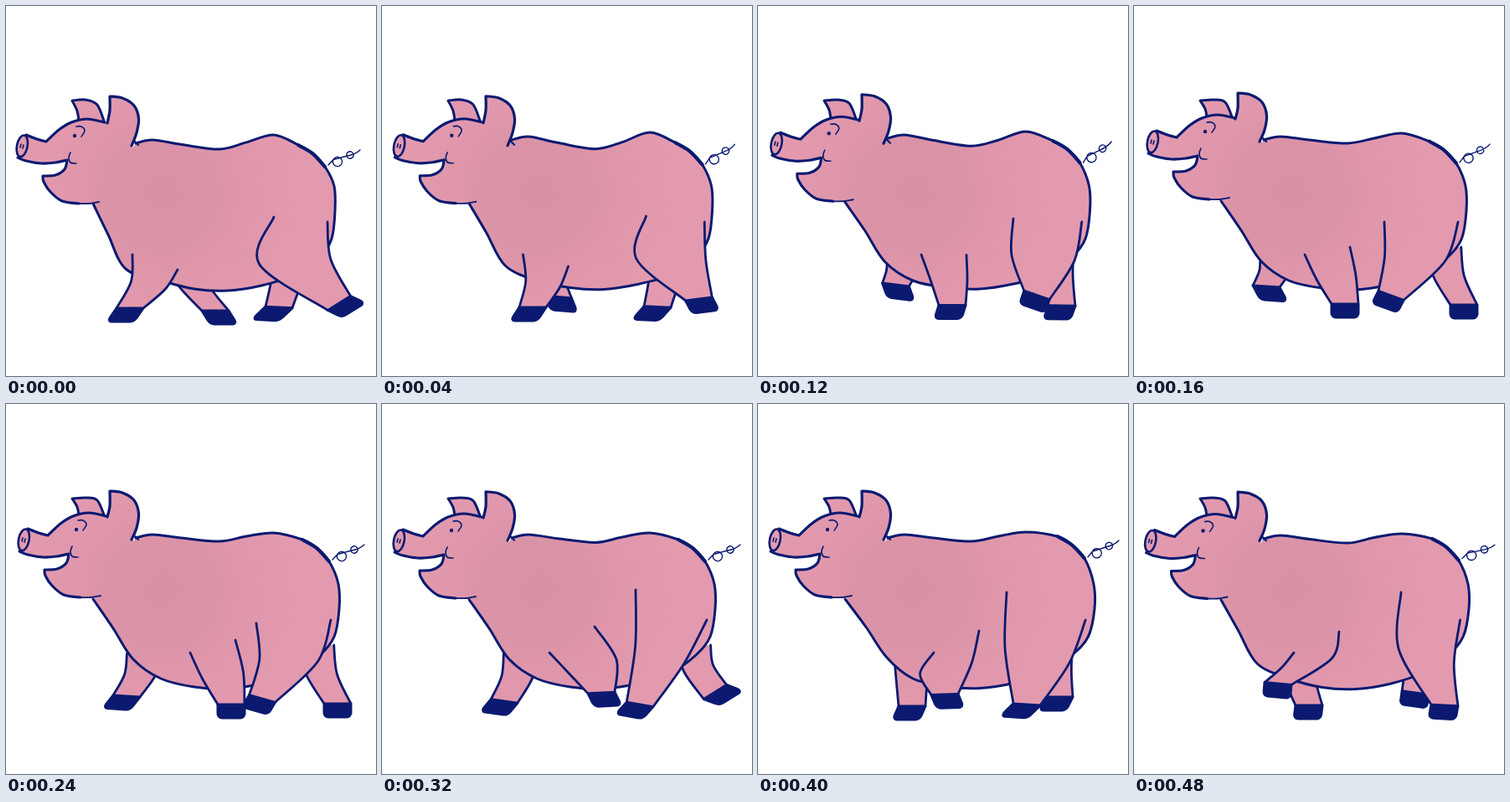
These frames come from a looping animation (442x442 px, 560 ms). An HTML page with a canvas:

```html
<!DOCTYPE html>
<html lang="en">
<head>
<meta charset="utf-8">
<title>Walking pig</title>
<style>
  html, body { margin: 0; width: 100%; height: 100%; overflow: hidden; background: #fff; }
  canvas { display: block; width: 100vw; height: 100vh; }
</style>
</head>
<body>
<canvas width="442" height="442"></canvas>
<script>
const ctx = document.querySelector('canvas').getContext('2d');
const INK = '#0b1a70';
const PINK = ctx.createRadialGradient(185, 222, 10, 185, 222, 170);
PINK.addColorStop(0, '#d991a6');
PINK.addColorStop(0.35, '#db93a8');
PINK.addColorStop(0.6, '#e097ac');
PINK.addColorStop(1, '#e39aaf');

// Seven key poses of the walk, one row each.
// Shifts: head x, head y, shoulder, hump, rump, chest
const BODY = [
  [-3, 5, 4, 0, -5, -9], [-.5, 4.5, -4, -6, -2, -1], [0, 0, 0, -2, -1, 0], [-1, 0, 0, 0, 0, 0],
  [-2, 1, 0, 0, 0, 0], [-2, 0, 0, -1, 4, 2], [-2.5, 1.5, 1, 1, 2, -5]
];
// Ankle x, ankle y, hoof tilt in degrees, hoof skew
const FAR_FRONT = [
  [250, 364, 0, 10], [171, 331, 10, 6], [158, 335, 4, 10], [144, 349, 4, -11],
  [146, 355, 8, -10], [184, 361, 0, -7], [209, 360, 0, -2]
];
const FAR_HIND = [
  [326, 360, 3, -15], [332, 359, 2, -11], [394, 357, 0, 0], [396, 358, 0, 0],
  [398, 344, -32, 12], [360, 350, 0, -8], [336, 345, 8, 0]
];
// The same, then one hip corner x and y, front bend, back bend
const NEAR_FRONT = [
  [148, 361, 0, -11, 205, 315, 8, 6], [212, 359, 0, -10, 240, 307, 3, 1],
  [252, 356, 0, 0, 258, 288, -2, 2], [269, 359, 0, 0, 274, 282, -2, 4],
  [262, 345, -3, 7, 254, 266, 0, 14], [223, 347, -2, 6, 264, 271, -15, 4],
  [172, 334, 5, 0, 245, 272, 3, 20]
];
const NEAR_HIND = [
  [398, 355, -32, 10, 320, 252, -50, -10], [359, 345, 18, 2, 311, 250, -21, 4],
  [307, 346, 20, -2, 299, 258, 4, 17], [306, 352, 16, -4, 299, 262, 8, 18],
  [308, 359, 10, -10, 303, 222, 5, 5], [321, 359, 4, -14, 297, 225, -6, 8],
  [371, 360, 3, -2, 319, 225, -21, -6]
];

// [start in ms, pose]; a half means midway to the next pose.
const STEPS = [[0, 0], [40, .5], [80, 1], [120, 1.5], [160, 2],
  [240, 3], [320, 4], [360, 4.5], [400, 5], [480, 6]];
const LOOP = 560;

const points = text => text.split(' ').map(pair => pair.split(',').map(Number));
const CROWN = points('121,134 100,130 81,134 66,143 51,157');
const SNOUT = points('51,157 40,154 27,149');
const JAW = [
  points('17,176 27,180 45,183 62,182 76,179'),
  points('76,179 73,190 62,197 47,198'),
  points('47,198 48,205 56,217 70,228 90,231')
];
const THROAT = points('90,231 103,231 114,229');
const NECK = points('150,225 158,168');
const FACE = ['21,160 20,164', '24,161 23,165', '80,170 78,176 80,182 87,183',
  '87,139 93,139 97,144 93,151'].map(points);

const mix = (a, b, k) => a + (b - a) * k;

function keyed(track, pose) {
  const to = track[Math.ceil(pose)];
  return track[Math.floor(pose)].map((v, i) => mix(v, to[i], pose % 1));
}

// Smooth curve through the points, joined to the current path.
function curve(p) {
  ctx.lineTo(...p[0]);
  for (let i = 0; i < p.length - 1; i++) {
    const a = p[i - 1] || p[i], b = p[i], c = p[i + 1], d = p[i + 2] || c;
    ctx.bezierCurveTo(b[0] + (c[0] - a[0]) / 6, b[1] + (c[1] - a[1]) / 6,
      c[0] - (d[0] - b[0]) / 6, c[1] - (d[1] - b[1]) / 6, ...c);
  }
}

function fill(...curves) {
  ctx.beginPath();
  curves.forEach(curve);
  ctx.fillStyle = PINK;
  ctx.fill();
}

function line(width, ...curves) {
  ctx.beginPath();
  curves.forEach(curve);
  ctx.lineWidth = width;
  ctx.stroke();
}

function drawLeg([x, y, tilt, skew], frontTop, backTop, frontBend, backBend) {
  const angle = tilt * Math.PI / 180, half = 16, depth = 16;
  const edge = (top, side, bend) => {
    const ankle = [x + side * half * Math.cos(angle), y + side * half * Math.sin(angle)];
    return [top, [mix(top[0], ankle[0], .5) + bend, mix(top[1], ankle[1], .5)], ankle];
  };
  const front = edge(frontTop, -1, frontBend), back = edge(backTop, 1, backBend);
  fill(front, [...back].reverse());
  line(2.8, front);
  line(2.8, back);

  ctx.save();
  ctx.translate(x, y);
  ctx.rotate(angle);
  ctx.transform(1, 0, skew / depth, 1, 0, 0);
  ctx.beginPath();
  ctx.roundRect(-half, 0, half * 2, depth, [0, 0, 5, 5]);
  ctx.restore();
  ctx.fillStyle = INK;
  ctx.fill();
  ctx.lineWidth = 3;
  ctx.stroke();
}

// A hidden hip follows its foot at half speed around the resting place.
function drawFarLeg(foot, restX, hipY) {
  const hip = mix(restX, foot[0], .45), bend = (hip - foot[0]) * .25;
  drawLeg(foot, [hip - 21, hipY], [hip + 21, hipY], bend, bend);
}

function drawTail(x, y, lift) {
  ctx.save();
  ctx.translate(x, y);
  ctx.rotate(lift);
  ctx.beginPath();
  ctx.moveTo(0, 0);
  ctx.arc(11, -4, 5.6, Math.PI * 1.15, Math.PI * 3.6);
  ctx.arc(26, -12, 4.2, Math.PI * .9, Math.PI * 3.5);
  ctx.quadraticCurveTo(33, -13, 38, -18);
  ctx.lineWidth = 1.4;
  ctx.stroke();
  ctx.restore();
}

function drawBody([, dip, shoulder, hump, rump, chest]) {
  const saddle = dip * 1.4, drop = hump * .5 - rump * .8, belly = hump * .5;
  const rumpMark = [[354 + rump, 162 + drop], [371 + rump, 172 + drop], [386 + rump, 188 + drop]];
  const outline = [
    [155, 160 + shoulder], [175, 156 + shoulder], [210, 160 + (shoulder + saddle) / 2],
    [255, 164 + saddle], [287, 158 + saddle * .7], [320, 154 + hump],
    ...rumpMark, [397 + rump, 215], [398 + rump, 245], [392 + rump * .6, 278],
    [375, 300], [345, 321], [305, 334 + belly], [265, 340 + belly], [225, 338 + belly],
    [185, 328], [152 + chest, 305 - chest], [128 + chest * .7, 268 - chest * .5], [104, 233 + dip * .6]
  ];
  fill(outline);
  line(3, outline);
  line(4.2, rumpMark);
}

function drawHead(x, y) {
  const at = p => p.map(([px, py]) => [px + x, py + y]);
  const leftTip = [79, 113], rightTip = [124, 104 + y * .8];

  const leftEar = [
    [[87, 133 + y], [85, 123 + y * .5], leftTip],
    [leftTip, [95, 112], [109, 115 + y * .6], [118, 135 + y]]
  ];
  fill(...leftEar, [[110, 145]]);
  line(3, ...leftEar);

  fill(...[CROWN, SNOUT, ...JAW, THROAT, NECK].map(at));
  line(3.1, at(CROWN), at(SNOUT));
  line(3.1, ...JAW.map(at));
  line(1.8, at(THROAT));

  ctx.beginPath();
  ctx.ellipse(22.3 + x, 162.3 + y, 6.3, 13, .2, 0, Math.PI * 2);
  ctx.fillStyle = PINK;
  ctx.fill();
  ctx.lineWidth = 2.6;
  ctx.stroke();
  FACE.forEach(part => line(1.6, at(part)));
  ctx.beginPath();
  ctx.arc(85 + x, 150 + y, 2.2, 0, Math.PI * 2);
  ctx.fillStyle = INK;
  ctx.fill();

  const rightEar = [
    [[121, 135 + y], [124, 122 + y * .5], rightTip],
    [rightTip, [139, 106 + y * .8], [153, 115 + y * .8], [158.5, 131 + y * .7],
      [156, 148 + y * .7], [150, 162 + y]]
  ];
  fill(...rightEar, [[128, 166 + y]]);
  line(3.2, ...rightEar);
  line(2.2, [[153, 157 + y * .8], [158, 162 + y * .8]]);
}

function draw(pose) {
  const body = keyed(BODY, pose), [headX, headY, , hump, rump] = body;
  const [nearFront, nearHind] = [NEAR_FRONT, NEAR_HIND].map(track => keyed(track, pose));
  const [shoulderX, shoulderY, ...frontBends] = nearFront.slice(4);
  const [haunchX, haunchY, ...hindBends] = nearHind.slice(4);

  ctx.clearRect(0, 0, 442, 442);
  ctx.strokeStyle = INK;
  ctx.lineCap = ctx.lineJoin = 'round';
  drawFarLeg(keyed(FAR_FRONT, pose), 183, 298);
  drawFarLeg(keyed(FAR_HIND, pose), 350, 288);
  drawTail(390 + rump, 186 - rump * .8, hump * .05);
  drawBody(body);
  drawHead(headX, headY);
  drawLeg(nearFront, [shoulderX - 54, 297], [shoulderX, shoulderY], ...frontBends);
  drawLeg(nearHind, [haunchX, haunchY], [388 + rump * .8, 258], ...hindBends);
}

const start = performance.now();
function tick() {
  const time = (performance.now() - start) % LOOP;
  draw(STEPS.findLast(([from]) => from <= time)[1]);
  requestAnimationFrame(tick);
}
tick();
</script>
</body>
</html>
```
